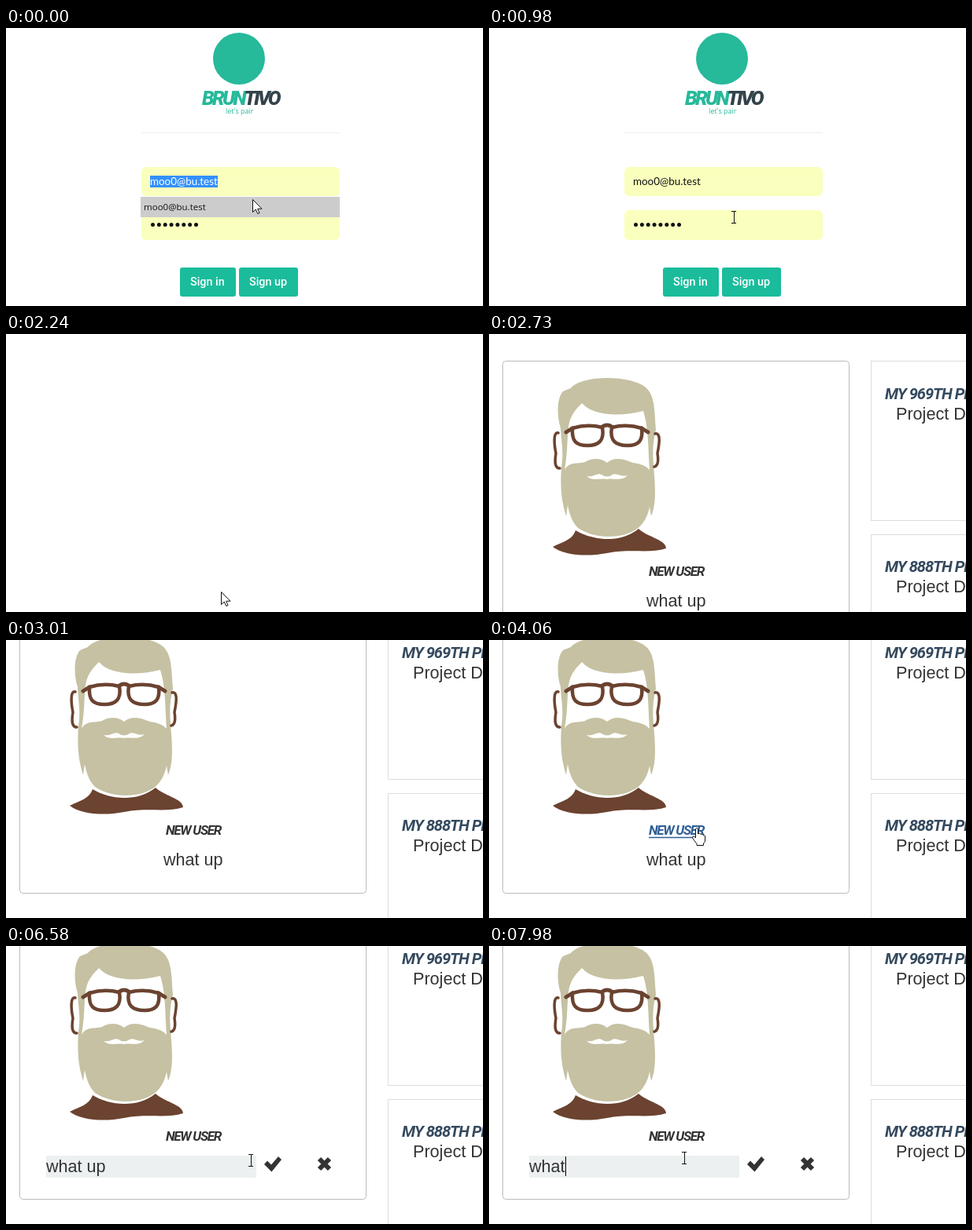
Animation, 606 px wide and 354 px high, one loop 8 s. Source, as an HTML page:

```html
<!DOCTYPE html>
<html lang="en">
<head>
<meta charset="utf-8">
<title>Sign in and edit profile</title>
<style>
  html, body { margin: 0; width: 100%; height: 100%; overflow: hidden; background: #fff; }
  svg { display: block; width: 100vw; height: 100vh; }
  text { white-space: pre; }
  .lato { font: 13.4px Lato, sans-serif; fill: #111; }
  .button { font: 500 14.4px Roboto, sans-serif; fill: #fff; }
  .body { font: 21.6px "Liberation Sans", Arial, sans-serif; fill: #333; }
  .title { font: italic bold 20px Roboto, sans-serif; letter-spacing: -1px; fill: #34495e; }
  .name { font: italic bold 17px Roboto, sans-serif; letter-spacing: -1.3px; }
  .brand { font: italic 900 25px Roboto, sans-serif; letter-spacing: -2.7px; }
  .box { fill: #fff; stroke: #ddd; }
</style>
</head>
<body>
<svg viewBox="0 0 606 354">
  <g id="login">
    <circle cx="296" cy="39" r="33" fill="#26b99a"/>
    <text class="brand" x="249" y="98" fill="#26b99a">BRUN<tspan fill="#34434b">TIVO</tspan></text>
    <text x="279" y="109" font-family="Open Sans, sans-serif" font-size="9" fill="#26b99a">let's pair</text>
    <path d="M172 133.5H424" stroke="#eee"/>
    <g fill="#faffbd">
      <rect x="172" y="177" width="252" height="37" rx="6"/>
      <rect x="172" y="232" width="252" height="38" rx="6"/>
    </g>
    <rect id="selection" x="183" y="188" width="86" height="15" fill="#3390ff"/>
    <text id="email" class="lato" x="183" y="200">moo0@bu.test</text>
    <rect id="emailCaret" x="269" y="188" width="1" height="15"/>
    <path d="M186.5 250.5H242.5" stroke="#111" stroke-width="5" stroke-linecap="round" stroke-dasharray="0 7.86"/>
    <g id="suggestion">
      <rect x="171" y="215" width="253" height="26" fill="#ccc"/>
      <text x="175" y="232" font-family="Open Sans, sans-serif" font-size="11.5" fill="#111">moo0@bu.test</text>
    </g>
    <rect id="signIn" x="221" y="305" width="71" height="37" rx="3"/>
    <rect id="signUp" x="296" y="305" width="75" height="37" rx="3"/>
    <text class="button" x="234" y="328">Sign in</text>
    <text class="button" x="309" y="328">Sign up</text>
  </g>

  <g id="profile">
    <rect class="box" x="17.5" y="-25.5" width="440" height="348" rx="4" style="stroke:#bbb"/>
    <g fill="#6b4330">
      <path d="M81 211C95 204 106 202 110 190C130 202 165 208 190 188C200 198 225 202 225 213C205 220 180 213 150 219C125 224 95 222 81 211Z"/>
      <path fill="#c5c1a2" d="M104 9C118-8 180-8 199 8C211 18 210 38 212 62C207 82 208 95 210 120C212 145 211 160 206 172L204 160C200 180 190 191 170 196C150 200 130 198 113 187C105 179 102 168 100 158L98 172C93 155 90 140 92 110C95 90 92 80 91 60C86 45 86 22 94 13Z"/>
      <path fill="#fff" d="M118 28C130 42 160 47 196 38C203 60 202 85 204 113C195 104 188 106 180 103C168 98 158 97 150 104C142 97 130 98 122 103C112 106 102 102 96 113C100 90 99 75 101 58C103 45 108 38 118 28ZM124 121C132 123 138 116 143 119Q150 124 157 119C162 116 168 123 176 120C168 128 160 123 150 125C140 123 132 128 124 121Z"/>
      <g fill="none" stroke="#6b4330" stroke-width="3.5" stroke-linecap="round">
        <path d="M88 66C81 64 83 82 85 92C83 104 84 111 90 111M211 67C219 65 216 82 214 92C216 104 214 108 210 109"/>
        <path stroke-width="5" d="M98 65L106 60M194 60L202 65M144 58Q150 54 156 58"/>
        <path stroke-width="4.5" fill="#fff" d="M106 60Q125 54 144 59C147 76 139 82 125 82C110 82 105 76 106 60ZM156 59Q175 54 194 60C196 76 190 82 176 82C161 82 153 76 156 59Z"/>
      </g>
    </g>
    <text id="name" class="name" x="203" y="248">NEW USER</text>
    <path id="underline" d="M203 251.5H274" stroke="#2f5f95" stroke-width="1.5"/>
    <text id="status" class="body" x="200" y="287">what up</text>
    <g id="editor">
      <rect x="51" y="267" width="267" height="28" fill="#ecf0f1"/>
      <text id="draft" class="body" x="51" y="288"></text>
      <rect id="draftCaret" y="268" width="1" height="25"/>
      <path d="M328 278L332 273.5L337 278.5L346 268L350 272L337.5 287.5Z" fill="#333"/>
      <path d="M398 271L411 284M411 271L398 284" stroke="#333" stroke-width="6"/>
    </g>
    <rect class="box" x="485.5" y="-25.5" width="300" height="203"/>
    <rect class="box" x="485.5" y="195.5" width="300" height="203"/>
    <text class="title" x="503" y="23">MY 969TH PROJECT</text>
    <text class="body" x="517" y="49">Project Description</text>
    <text class="title" x="503" y="243">MY 888TH PROJECT</text>
    <text class="body" x="517" y="269">Project Description</text>
  </g>

  <path id="cursor" fill="#fff" stroke="#111" stroke-linejoin="round"/>
</svg>
<script>
  const LOOP = 8000, STEP = 70;
  const el = id => document.getElementById(id);
  const show = (id, on) => el(id).style.display = on ? '' : 'none';
  const within = (v, from, to) => v >= from && v < to;
  const over = ([x, y], left, top, right, bottom) => within(x, left, right) && within(y, top, bottom);

  const shapes = {
    arrow: 'M.5 .5V16.5L4.3 13L6.8 18.5L9 17.5L6.7 12.2H12Z',
    hand: 'M-1.5 2C-1.5 0 1.5 0 1.5 2V8C3 6.5 5 7 5 8.5C6 7.5 8 8 8 9.7C9 9 10.5 9.5 10.5 11V16Q10.5 19 8.5 20V22.5H0V20.5Q-3 17-5.5 13Q-5.5 10.5-3.5 11L-1.5 13Z',
    beam: 'M-3-7.5H3M.5-7.5V7.5M-3 7.5H3'
  };

  // Pointer hotspot: time, x, y
  const track = [
    [840, 313, 218], [1190, 309, 275], [1330, 301, 318], [1540, 258, 325],
    [2100, 258, 325], [2240, 273, 328], [2450, 285, 360],
    [3010, 300, 380], [3640, 253, 242], [3710, 253, 242], [4060, 264, 239],
    [4200, 264, 239], [4550, 248, 282], [4620, 248, 282], [4690, 248, 283],
    [5670, 248, 283], [5880, 312, 280], [6020, 342, 274],
    [6510, 342, 274], [6720, 248, 271], [7070, 248, 271], [7210, 248, 270]
  ];

  function pointerAt(t) {
    const next = track.findIndex(p => p[0] > t);
    if (next === 0) return track[0].slice(1);
    if (next < 0) return track[track.length - 1].slice(1);
    const [t0, x0, y0] = track[next - 1], [t1, x1, y1] = track[next];
    const k = (t - t0) / (t1 - t0);
    return [Math.round(x0 + (x1 - x0) * k), Math.round(y0 + (y1 - y0) * k)];
  }

  function drawLogin(t, p) {
    const selected = t < 280;
    show('selection', selected);
    show('suggestion', selected);
    el('email').style.fill = selected ? '#fff' : '';
    show('emailCaret', within(t, 280, 770) || within(t, 1260, 1750));
    const onIn = over(p, 221, 305, 292, 342), onUp = over(p, 296, 305, 371, 342);
    el('signIn').setAttribute('fill', within(t, 1890, 1960) ? '#16a085' : onIn ? '#48c9b0' : '#1abc9c');
    el('signUp').setAttribute('fill', onUp ? '#48c9b0' : '#1abc9c');
    if (onIn || onUp) return 'hand';
    return over(p, 172, 232, 424, 270) ? 'beam' : 'arrow';
  }

  function drawProfile(t, p) {
    el('profile').setAttribute('transform', `translate(0 ${t < 3010 ? 60 : 0})`);
    const editing = t >= 4830;
    const onName = over(p, 203, 232, 276, 253);
    el('name').setAttribute('fill', onName ? '#2f5f95' : '#333');
    show('underline', onName);
    show('status', !editing);
    show('editor', editing);
    const [draft, caret] = t < 7700 ? ['what up', 127] : t < 7910 ? ['what u', 115]
      : t < 7980 ? ['what ', 103] : ['what', 97];
    el('draft').textContent = draft;
    el('draftCaret').setAttribute('x', caret);
    show('draftCaret', within(t, 6650, 7140) || t >= 7700);
    if (onName || (editing && over(p, 326, 265, 352, 290))) return 'hand';
    const field = editing ? [51, 262, 318, 295] : [200, 267, 276, 293];
    return over(p, ...field) ? 'beam' : 'arrow';
  }

  function draw(now) {
    const t = Math.floor((now % LOOP) / STEP) * STEP;
    const p = pointerAt(t);
    const login = t < 2100, profile = t >= 2730;
    show('login', login);
    show('profile', profile);
    const kind = login ? drawLogin(t, p) : profile ? drawProfile(t, p) : 'arrow';
    el('cursor').setAttribute('d', shapes[kind]);
    el('cursor').setAttribute('transform', `translate(${p})`);
    requestAnimationFrame(tick);
  }

  const start = performance.now();
  const tick = () => draw(performance.now() - start);
  tick();
</script>
</body>
</html>
```
